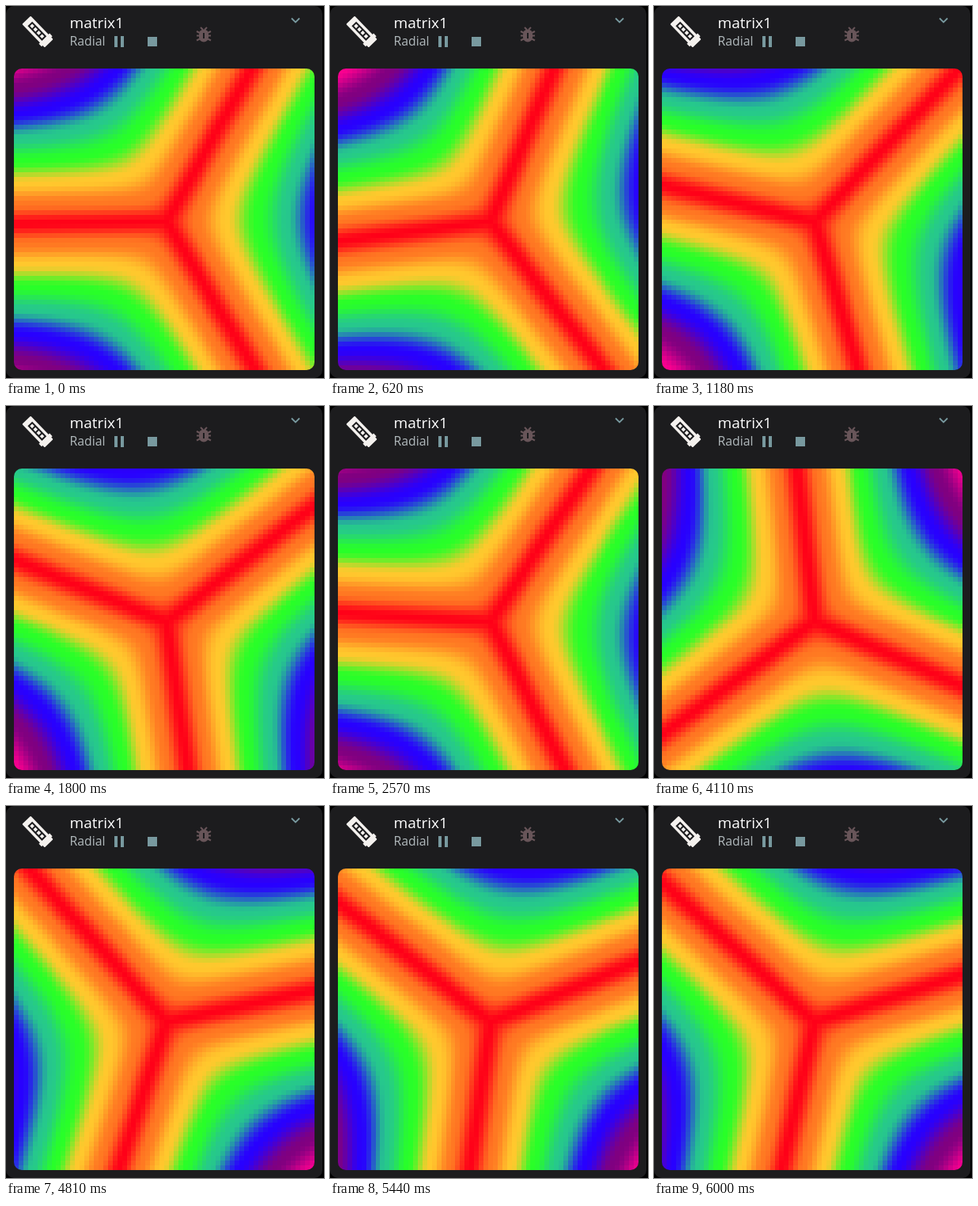
Write an HTML page with a canvas that moves like this. It is 402 px wide and 470 px high and loops after 6.07 s.

```html
<!DOCTYPE html>
<html lang="en">
<head>
<meta charset="utf-8">
<title>Radial</title>
<style>
  html, body { margin: 0; width: 100%; height: 100%; overflow: hidden; background: #000; }
  svg, canvas { position: absolute; display: block; }
  svg { left: 0; top: 0; }
  canvas { left: 10px; top: 79px; width: 380px; height: 381px; border-radius: 10px; image-rendering: pixelated; }
  text { font-family: "Open Sans", "Noto Sans", sans-serif; }
</style>
</head>
<body>
<svg width="402" height="470" viewBox="0 0 402 470">
  <rect width="400" height="470" rx="10" fill="#1c1c1e"/>

  <g transform="translate(40 32.5) rotate(46)" fill="#f4f1ee">
    <rect x="-20.5" y="-7.5" width="41" height="15" rx="1"/>
    <rect x="12" y="-9.5" width="5" height="19"/>
    <rect x="-14" y="-4" width="26" height="8" fill="#1c1c1e"/>
    <path d="M-12 0H10" stroke="#f4f1ee" stroke-width="4" stroke-dasharray="4 2"/>
  </g>

  <text x="80.5" y="28" font-size="19" fill="#fff">matrix1</text>
  <text x="80.5" y="50" font-size="15.8" fill="#b1b9bc">Radial</text>

  <path d="M137 38h4v14h-4zM145 38h4v14h-4zM179 39h12v12h-12z" fill="#78999f"/>
  <path d="M361 15.5l5 5 5-5" fill="none" stroke="#78999f" stroke-width="1.8"/>

  <g stroke="#685559" stroke-width="2" fill="none">
    <path d="M246 27l3 3M254 27l-3 3M241 32l4 2M259 32l-4 2M241 37.5h18M241 43.5l4-2M259 43.5l-4-2"/>
    <rect x="244" y="29.5" width="12" height="16" rx="6" fill="#685559" stroke="none"/>
    <path d="M250 34v7" stroke="#1c1c1e"/>
  </g>
</svg>
<canvas id="matrix" width="64" height="64"></canvas>

<script>
const LOOP = 6070, STEP = 70, SIZE = 64, CELL = 380 / SIZE;
const BAND = 38; // field strength from one hue to the next
const ctx = document.getElementById('matrix').getContext('2d');
const image = ctx.createImageData(SIZE, SIZE);

const hues = ['ff0018', 'ff7822', 'ffc82d', '28ff28', '26c88c', '2800ff', '800080', 'ff0090']
  .map(hex => hex.match(/../g).map(pair => parseInt(pair, 16)));

// Rotation in degrees at a few steps; the speed drifts a little
const spin = [[0, 60.9], [9, 187.4], [26, 398], [37, 536.7], [50, 676.5], [69, 972], [86, 1217.6]];

const mix = (a, b, k) => a + (b - a) * k;

function colour(field) {
  const pos = Math.min(field / BAND, hues.length - 1.001);
  const i = Math.floor(pos), k = pos - i;
  const ease = k * k * (3 - 2 * k);
  return hues[i].map((v, c) => mix(v, hues[i + 1][c], ease));
}

function rotation(step) {
  const i = Math.max(1, spin.findIndex(([at]) => at >= step));
  const [from, a] = spin[i - 1], [to, b] = spin[i];
  return mix(a, b, (step - from) / (to - from)) * Math.PI / 180;
}

function draw(turn) {
  for (let y = 0; y < SIZE; y++) {
    for (let x = 0; x < SIZE; x++) {
      const dx = x - SIZE / 2, dy = SIZE / 2 - y;
      const angle = Math.atan2(dy, dx) - turn;
      const field = CELL * Math.hypot(dx, dy) * Math.abs(Math.sin(1.5 * angle));
      image.data.set([...colour(field), 255], (y * SIZE + x) * 4);
    }
  }
  ctx.putImageData(image, 0, 0);
}

let shown = -1;
const start = performance.now();

function tick() {
  const t = (performance.now() - start) % LOOP;
  // The first steps run slightly short
  const step = Math.floor((t + Math.min(20, t / 60)) / STEP);
  if (step !== shown) {
    shown = step;
    draw(rotation(step));
  }
  requestAnimationFrame(tick);
}
tick();
</script>
</body>
</html>
```
